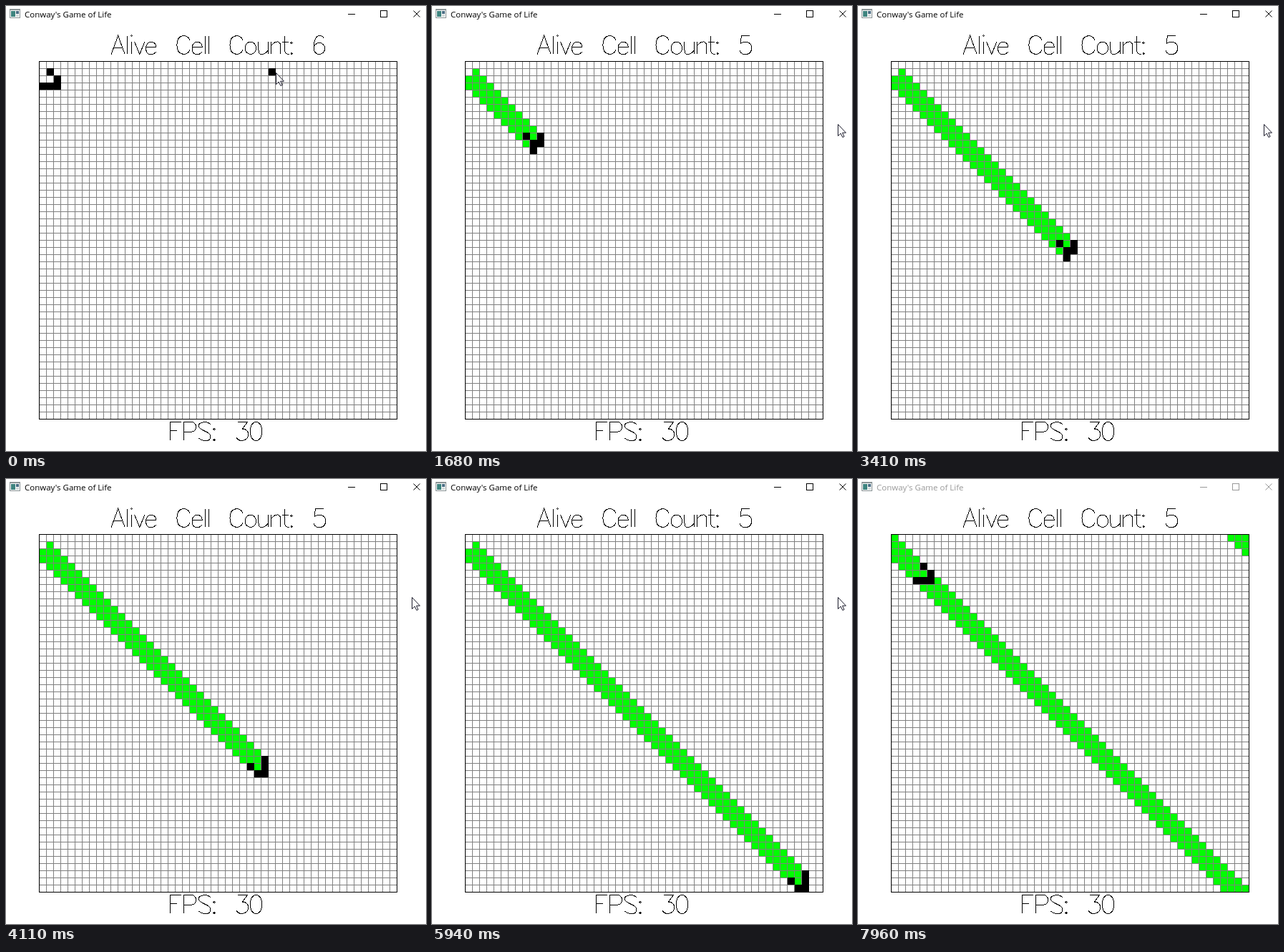
An HTML page with a canvas that plays this animation: 587x622 px, repeating every 8.02 s.

```html
<!DOCTYPE html>
<html lang="en">
<head>
<meta charset="utf-8">
<title>Conway's Game of Life</title>
<style>
  html, body { margin: 0; width: 100%; height: 100%; overflow: hidden; background: #fff; }
  #stage { position: relative; width: 587px; height: 622px; color: #000; }
  #stage.idle { color: #999; }
  #stage > * { position: absolute; left: 0; top: 0; margin: 0; }
  #stage .title {
    left: 26px; top: 3px; white-space: pre;
    font: 11.5px/17px "Open Sans", "Noto Sans", sans-serif;
  }
  /* selectable copies of the stroke lettering */
  #stage .copy { color: transparent; white-space: pre; font: 30px/32px Lato, sans-serif; }
  path, line { fill: none; }
  .lettering path { stroke: #000; vector-effect: non-scaling-stroke; shape-rendering: crispEdges; }
  .buttons { stroke: currentColor; }
</style>
</head>
<body>
<div id="stage">
  <canvas id="board" width="587" height="622"></canvas>
  <p class="title">Conway's Game of Life</p>
  <p class="copy" style="left:147px;top:39px" id="countText"></p>
  <p class="copy" style="left:228px;top:579px">FPS: 30</p>
  <svg width="587" height="622">
    <g shape-rendering="crispEdges">
      <rect x="5" y="4" width="15" height="13" fill="#8b9496"/>
      <rect x="6" y="6" width="13" height="10" fill="#f7f9f9"/>
      <rect x="7" y="7" width="6" height="8" fill="#3f8580"/>
      <rect x="14" y="7" width="4" height="4" fill="#4d6f86"/>
      <rect x="14" y="12" width="4" height="3" fill="#d3dada"/>
    </g>
    <g class="buttons">
      <path d="M478 11.5h10M523.5 6.5h9v9h-9z" shape-rendering="crispEdges"/>
      <path d="M569.5 6.5l9 9m0-9l-9 9"/>
    </g>
    <g class="lettering" id="count"></g>
    <g class="lettering" id="fps"></g>
    <path id="cursor" d="M.5.5V16.6L4.2 13.1 6.9 18.5 9.1 17.5 6.6 12.2H11.5Z"
      style="fill:#fff;stroke:#1a1a2a"/>
  </svg>
</div>
<script>
const LOOP = 8020, SIZE = 50, CELL = 10, LEFT = 46, TOP = 77;
const STRAY = [32, 1];
const $ = id => document.getElementById(id);

// Stroke letters, 21 units tall: advance, path, left shift
const LETTERS = {
  ' ': [22, ''],
  A: [16.9, 'M1 21 9 0 17 21M4 14H14', .9],
  C: [17.74, 'M18 5C16.5-1.6 3-3 3 10.5S16.5 22.6 18 16'],
  F: [16.54, 'M4 21V0H17M4 10H12'],
  P: [18, 'M4 21V0H13C19.7 0 19.7 11 13 11H4'],
  S: [16.98, 'M17 3C14-1 3-1 3 4.5S17 10 17 16.5 6 21.5 3 18', 1.5],
  e: [14.39, 'M3 13H15C15 4.8 3 4.8 3 14S11.5 22.5 15 18'],
  i: [6.06, 'M3 0 4-1 5 0 4 1ZM4 7V21', 1],
  l: [4.06, 'M4 0V21'],
  n: [14.89, 'M4 7V21M4 11C8 6.5 15 4 15 12V21', 2],
  o: [15.07, 'M3 14a6.5 7 0 1 1 13 0a6.5 7 0 1 1-13 0'],
  t: [8.27, 'M5 0V17Q5 21 10 21M2 7H9'],
  u: [14.89, 'M4 7V16C4 24 11 21.5 15 17M15 7V21', 2],
  v: [12.6, 'M2 7 8 21 14 7', 1.6],
  ':': [5.5, 'M5 7 4 8 5 9 6 8ZM5 19 4 20 5 21 6 20Z', 2.2],
  0: [16.18, 'M10 0C19.3 0 19.3 21 10 21S.7 0 10 0'],
  3: [16.18, 'M5 0H16L10 8C19.5 7 19.5 21 9.5 21Q4.5 21 3 17'],
  5: [16.3, 'M15 0H5L4 9C8 6 17 6 17 14S6 24 3 17'],
  6: [15.5, 'M16 3C13-2.5 4-2.5 4 14.5a6.5 6.5 0 1 0 13 0a6.5 6.5 0 1 0-13 0', 2.7]
};

function letter(id, text, x, y) {
  let pen = 0, out = '';
  for (const ch of text) {
    const [advance, d, shift = 1.8] = LETTERS[ch];
    if (d) out += `<path transform="translate(${pen - shift})" d="${d}"/>`;
    pen += advance;
  }
  $(id).setAttribute('transform', `translate(${x} ${y}) scale(1.19 1.238)`);
  $(id).innerHTML = out;
}

// Life on a torus; a cell is the number row * SIZE + column
const wrap = n => (n + SIZE) % SIZE;
function nextGen(cells) {
  const sums = new Map();
  for (const c of cells)
    for (let dy = -1; dy < 2; dy++)
      for (let dx = -1; dx < 2; dx++) {
        if (!dx && !dy) continue;
        const k = wrap((c / SIZE | 0) + dy) * SIZE + wrap(c % SIZE + dx);
        sums.set(k, (sums.get(k) || 0) + 1);
      }
  return [...sums].filter(([k, n]) => n === 3 || n === 2 && cells.includes(k)).map(([k]) => k);
}

// Runs of screen updates: start, end, updates, generation reached
const RUNS = [
  [770, 1570, 27, 30], [1620, 2390, 26, 58], [2450, 3250, 28, 88], [3310, 4110, 28, 118],
  [4170, 4950, 28, 147], [4980, 5760, 24, 176], [5790, 6570, 25, 202], [6610, 6840, 10, 212]
];

// Updates done by time t in an evenly spaced run
function updates(t, start, end, n) {
  if (t < start) return 0;
  return Math.min(n, Math.floor((t - start) / (end - start) * (n - 1) + .001) + 1);
}

function genAt(t) {
  let from = 0, gen = 0;
  for (const [start, end, n, to] of RUNS) {
    const done = updates(t, start, end, n);
    if (!done) break;
    gen = from + Math.ceil(done * (to - from) / n - .12);
    from = to;
  }
  return gen;
}

const history = [[[1, 1], [2, 2], [0, 3], [1, 3], [2, 3]].map(([x, y]) => y * SIZE + x)];
while (history.length <= 212) history.push(nextGen(history[history.length - 1]));
const firstSeen = new Map();
history.forEach((cells, g) => cells.forEach(c => firstSeen.has(c) || firstSeen.set(c, g)));

const ctx = $('board').getContext('2d');
const fillCell = (x, y) => ctx.fillRect(LEFT + 1 + x * CELL, TOP + y * CELL, CELL, CELL);
const fillIndex = c => fillCell(c % SIZE, c / SIZE | 0);

function drawBoard(gen, stray) {
  const span = SIZE * CELL;
  ctx.fillStyle = '#fff';
  ctx.fillRect(0, 0, 587, 622);
  ctx.fillStyle = '#0f0';
  for (const [c, g] of firstSeen) if (g <= gen) fillIndex(c);
  ctx.fillStyle = '#808080';
  for (let i = 1; i < SIZE; i++) {
    ctx.fillRect(LEFT + i * CELL, TOP, 1, span);
    ctx.fillRect(LEFT, TOP + i * CELL, span, 1);
  }
  ctx.fillStyle = '#000';
  history[gen].forEach(fillIndex);
  if (stray) fillCell(...STRAY);
  ctx.strokeStyle = '#000';
  ctx.strokeRect(LEFT + .5, TOP + .5, span, span);
}

const mix = (a, b, p) => Math.round(a + (b - a) * p);
function moveCursor(t) {
  const away = updates(t, 7280, 7370, 5);
  const p = Math.max(0, updates(t, 90, 500, 10) - 1) / 9;
  const ease = p * p * (3 - 2 * p);
  const q = (away / 4) ** 1.5;
  const x = away ? mix(567, 494, q) : mix(377, 567, ease);
  const y = away ? mix(165, 532, q) : mix(93, 165, ease);
  $('cursor').setAttribute('transform', `translate(${x} ${y})`);
  $('cursor').style.display = away > 4 ? 'none' : '';
}

let shown = '';
function render(t) {
  const gen = genAt(t), stray = t < 90;
  const key = gen + ' ' + stray;
  if (key !== shown) {
    shown = key;
    const text = 'Alive Cell Count: ' + (history[gen].length + stray);
    drawBoard(gen, stray);
    letter('count', text, 147, 41.5);
    $('countText').textContent = text;
  }
  moveCursor(t);
  $('stage').classList.toggle('idle', t >= 7960);
}

letter('fps', 'FPS: 30', 226.5, 581.5);
const begin = performance.now();
function tick(now) {
  render(Math.max(0, now - begin) % LOOP);
  requestAnimationFrame(tick);
}
render(0);
requestAnimationFrame(tick);
</script>
</body>
</html>
```
